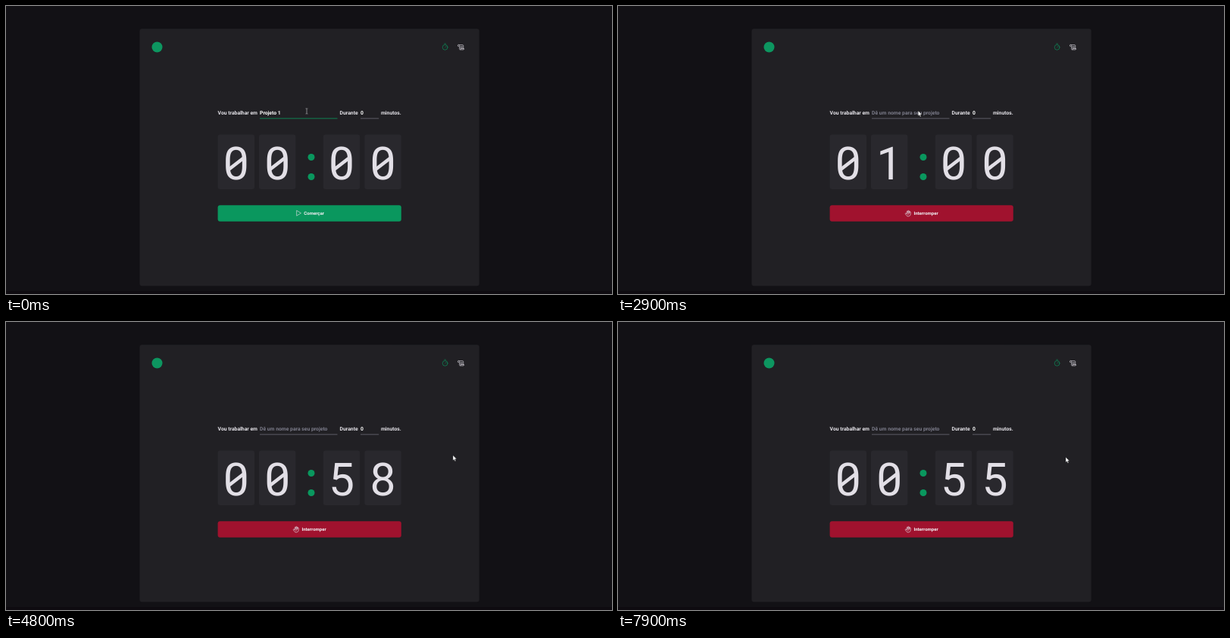
An HTML page that plays this animation: 800x382 px, repeating every 8 s.

```html
<!DOCTYPE html>
<html lang="pt">
<head>
<meta charset="utf-8">
<title>Timer</title>
<style>
  html, body { margin: 0; width: 100%; height: 100%; overflow: hidden; background: #121115; }
  svg { display: block; width: 800px; height: 382px; }
  text { font-family: Roboto, sans-serif; white-space: pre; text-rendering: geometricPrecision; }
  .form text { font-size: 6.81px; font-weight: 700; fill: #e6e4ea; }
  .form .value { fill: #fff; }
  .form .hint { fill: #7c7c8a; }
  .rule { fill: #6c6b76; }
  .rule.focus { fill: #0a975e; }
  .button text { font-size: 6.05px; font-weight: 700; fill: #f2f0f4; }
  .tile { fill: #29282d; }
  .digit { font-size: 60.54px; fill: #e2dfe6; text-anchor: middle; }
  .slash { stroke: #e2dfe6; stroke-width: 4.7; }
  .icon { fill: none; stroke: #e2dfe6; stroke-width: 1.7; stroke-linecap: round; stroke-linejoin: round; }
  .active { stroke: #0a975e; }
</style>
</head>
<body>
<svg viewBox="0 0 800 382">
  <rect y="378" width="800" height="4" fill="#0e0b10"/>
  <rect x="176.5" y="30.2" width="448.2" height="341" rx="3" fill="#212024"/>
  <circle cx="199.5" cy="54.5" r="7" fill="#0d9660"/>

  <g class="icon active" transform="translate(575.1 49.7) scale(.378)">
    <circle cx="12" cy="13.5" r="9"/>
    <path d="M12 13.5l4.2-4.2M9.5 1h5"/>
  </g>
  <g class="icon" transform="translate(596 50) scale(.378)">
    <path d="M10 10h7M10 14h7M4 9.5A3 3 0 1 1 6 4.2h12.5A2.7 2.7 0 0 1 20.5 7v11M6 4.2A3 3 0 0 1 7 7v11a3 3 0 0 0 3 3h11a2.8 2.8 0 0 0 1.5-4H11a3 3 0 0 1-1 4"/>
  </g>

  <g class="form">
    <text x="279.6" y="143.9">Vou trabalhar em</text>
    <text id="project" class="value" x="335" y="143.9"></text>
    <rect id="projectRule" class="rule" x="335" y="148.7" width="102.5" height=".8"/>
    <text x="440.6" y="143.9">Durante</text>
    <rect id="selection" x="468" y="137.4" width="4" height="8.4" fill="#2f6fc4"/>
    <text id="minutes" class="value" x="468" y="143.9"></text>
    <rect id="caret" x="471.5" y="137.7" width=".7" height="8" fill="#c5dcdc"/>
    <rect id="minutesRule" class="rule" x="468" y="148.7" width="24.2" height=".8"/>
    <g id="spinner">
      <rect x="486.2" y="137.4" width="5.6" height="8.2" fill="#ebebeb"/>
      <path d="M487.7 140.6l1.3-1.6 1.3 1.6zM487.7 142.5l1.3 1.6 1.3-1.6z" fill="#4c4c50"/>
    </g>
    <text x="494.9" y="143.9">minutos.</text>
  </g>

  <g id="clock">
    <g fill="#0a975e"><circle cx="403" cy="200.5" r="4.5"/><circle cx="403" cy="226.5" r="4.5"/></g>
  </g>

  <g class="button">
    <rect id="buttonFill" x="279.6" y="264.3" width="242.2" height="21.4" rx="3"/>
    <g id="start">
      <path class="icon" transform="translate(381.2 270.4) scale(.378)" d="M6.5 3.2v17.6L21 12z"/>
      <text x="393.3" y="277.1">Comerçar</text>
    </g>
    <g id="stop">
      <path class="icon" transform="translate(378.4 270.4) scale(.378)" d="M17 11V8.5a1.9 1.9 0 0 1 3.8 0v6a8.3 8.3 0 0 1-15.5 4.1L2.7 14A1.9 1.9 0 0 1 6 12.1L7.8 15V5.7a1.9 1.9 0 0 1 3.8 0V11V3.8a1.9 1.9 0 0 1 3.7 0V11V6a1.8 1.8 0 0 1 3.5 0M11 17a4 4 0 0 1 4-4"/>
      <text x="390.4" y="277.1">Interromper</text>
    </g>
  </g>

  <path id="beam" d="M395.6 136h1l.4.4.4-.4h1M397 136.4v6.2M395.6 143h1l.4-.4.4.4h1" fill="none" stroke="#a9a8ad" stroke-width=".75"/>
  <path id="arrow" d="M0 0v7l1.6-1.5 1.1 2.5 1.2-.5-1.1-2.5h2.2z" fill="#fff" stroke="#18171a" stroke-width=".4"/>
</svg>
<script>
  const LOOP = 8000, STEP = 100;
  const TAB = 500, TYPED = 1050, SUBMIT = 2700, FIRST_TICK = 3600, BLINK = 530;
  // time, x, y of the arrow's tip
  const PATH = [[3800, 396.2, 139], [4500, 577, 172], [4800, 590, 176.8], [5400, 591, 179.2]];

  const $ = id => document.getElementById(id);
  const show = (id, on) => $(id).style.display = on ? '' : 'none';

  function add(parent, name, attrs) {
    const el = document.createElementNS('http://www.w3.org/2000/svg', name);
    for (const key in attrs) el.setAttribute(key, attrs[key]);
    return parent.appendChild(el);
  }

  const digits = [279.6, 334, 418.8, 473.4].map(x => {
    const c = x + 24.2;
    add($('clock'), 'rect', { class: 'tile', x, y: 170.5, width: 48.4, height: 72.6, rx: 3 });
    return {
      glyph: add($('clock'), 'text', { class: 'digit', x: c, y: 230.3 }),
      slash: add($('clock'), 'line', { class: 'slash', x1: c - 10, y1: 217, x2: c + 10, y2: 201.5 })
    };
  });

  function setClock(seconds) {
    const pad = n => String(n).padStart(2, '0');
    const chars = pad(Math.floor(seconds / 60)) + pad(seconds % 60);
    digits.forEach(({ glyph, slash }, i) => {
      glyph.textContent = chars[i];
      slash.style.display = chars[i] === '0' ? '' : 'none';
    });
  }

  function arrowAt(t) {
    const next = PATH.findIndex(p => p[0] > t);
    if (next === 0) return PATH[0].slice(1);
    if (next < 0) return PATH[PATH.length - 1].slice(1);
    const [a, b] = [PATH[next - 1], PATH[next]];
    const k = (t - a[0]) / (b[0] - a[0]);
    return [1, 2].map(i => a[i] + (b[i] - a[i]) * k);
  }

  function draw(t) {
    const running = t >= SUBMIT;
    const inMinutes = t >= TAB && !running;
    const typed = t >= TYPED && !running;

    $('project').textContent = running ? 'Dê um nome para seu projeto' : 'Projeto 1';
    $('project').setAttribute('class', running ? 'hint' : 'value');
    $('minutes').textContent = typed ? '1' : '0';
    $('projectRule').classList.toggle('focus', t < TAB);
    $('minutesRule').classList.toggle('focus', inMinutes);
    show('selection', inMinutes && !typed);
    show('spinner', inMinutes);
    show('caret', typed && (t - TYPED) % (2 * BLINK) < BLINK);

    $('buttonFill').setAttribute('fill', running ? '#a0122e' : '#0a975e');
    show('start', !running);
    show('stop', running);

    const ticks = Math.max(0, Math.floor((t - FIRST_TICK) / 1000) + 1);
    setClock(running ? 60 - ticks : 0);

    show('beam', !running);
    show('arrow', running);
    $('arrow').setAttribute('transform', `translate(${arrowAt(t)})`);
  }

  function frame() {
    const t = performance.now() % LOOP;
    draw(Math.floor(t / STEP) * STEP);
    requestAnimationFrame(frame);
  }
  frame();
</script>
</body>
</html>
```
